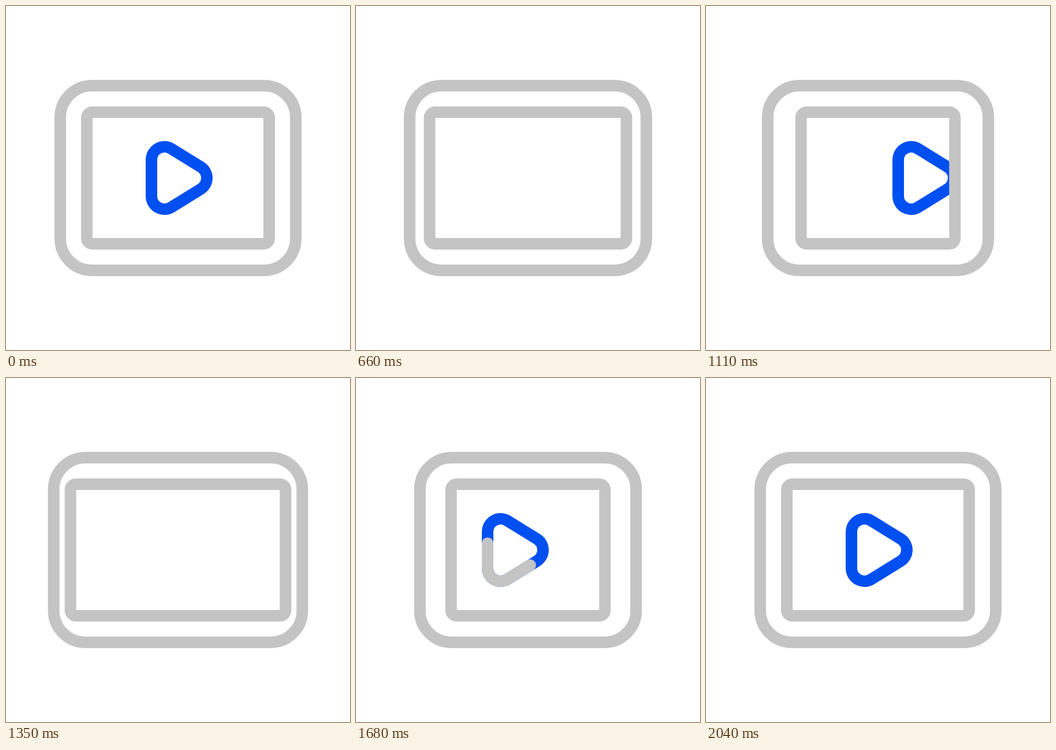
Recreate the animation shown at these times as an HTML page. Size 596 px wide and 596 px high, loop 2.25 s.

```html
<!DOCTYPE html>
<html lang="en">
<head>
<meta charset="utf-8">
<title>Video player</title>
<style>
  html, body { margin: 0; width: 100%; height: 100%; overflow: hidden; background: #fff; }
  svg { display: block; width: 100%; height: 100%; }
</style>
</head>
<body>
<svg viewBox="0 0 596 596" fill="none" stroke-width="20">
  <defs>
    <clipPath id="window"><rect id="opening" y="184" height="228"/></clipPath>
    <path id="triangle" pathLength="1" d="M252 266.5A22.5 22.5 0 0 1 286.3 247.35L337.3 278.85A22.5 22.5 0 0 1 337.3 317.15L286.3 348.65A22.5 22.5 0 0 1 252 329.5Z"/>
  </defs>
  <g clip-path="url(#window)">
    <g id="play">
      <use href="#triangle" stroke="#004ff0"/>
      <use id="sweep" href="#triangle" stroke="#c4c4c4" stroke-linecap="round"/>
    </g>
  </g>
  <g stroke="#c4c4c4">
    <rect id="screen" y="184" height="228" rx="9.5"/>
    <rect id="body" y="138" height="320" rx="55"/>
  </g>
</svg>
<script>
  const LOOP = 2250, STEP = 30, END = 2040, CENTER = 298;
  const [opening, play, sweep, screenBox, bodyBox] =
    ['opening', 'play', 'sweep', 'screen', 'body'].map(id => document.getElementById(id));

  // Time and added half width of the screen; the body follows later and less.
  const stretchKeys = [[120, 0], [450, -25], [870, 50], [1120, -25], [1480, 50], [1658, -25], [2000, 0]];
  const BODY_LAG = 40, BODY_SHARE = 0.72;

  const clamp = v => Math.min(1, Math.max(0, v));
  const sine = p => (1 - Math.cos(Math.PI * p)) / 2;
  const smooth = (t, start, length) => {
    const p = clamp((t - start) / length);
    return p * p * (3 - 2 * p);
  };

  function stretch(t) {
    return stretchKeys.slice(1).reduce((value, [time, target], i) => {
      const [from, base] = stretchKeys[i];
      return value + (target - base) * sine(clamp((t - from) / (time - from)));
    }, 0);
  }

  // Leaves to the right, crosses once, then glides back in from the left.
  function slide(t) {
    if (t < 780) return 29 * (t / 360) ** 4;
    if (t < 1300) return 81 + 1.9 * (t - 1110);
    return -24 * (Math.max(0, END - t) / 360) ** 4;
  }

  function trim(t) {
    return t < 1000
      ? [smooth(t, 136, 574), smooth(t, 30, 574)]
      : [smooth(t, 1476, 400), smooth(t, 1340, 400)];
  }

  function setHalfWidth(rect, half) {
    rect.setAttribute('x', CENTER - half);
    rect.setAttribute('width', 2 * half);
  }

  function render(t) {
    const inner = 158 + stretch(t);
    setHalfWidth(screenBox, inner);
    setHalfWidth(opening, inner);
    setHalfWidth(bodyBox, 204 + BODY_SHARE * stretch(t - BODY_LAG));
    play.setAttribute('transform', `translate(${slide(t)} 0)`);

    const [start, end] = trim(t);
    const length = end - start;
    sweep.setAttribute('visibility', length > 0.001 ? 'visible' : 'hidden');
    sweep.setAttribute('stroke-dasharray', `${length} 2`);
    sweep.setAttribute('stroke-dashoffset', -start);
  }

  const origin = performance.now();
  function tick() {
    const t = (performance.now() - origin) % LOOP;
    render(Math.min(END, Math.floor(t / STEP) * STEP));
    requestAnimationFrame(tick);
  }
  tick();
</script>
</body>
</html>
```
